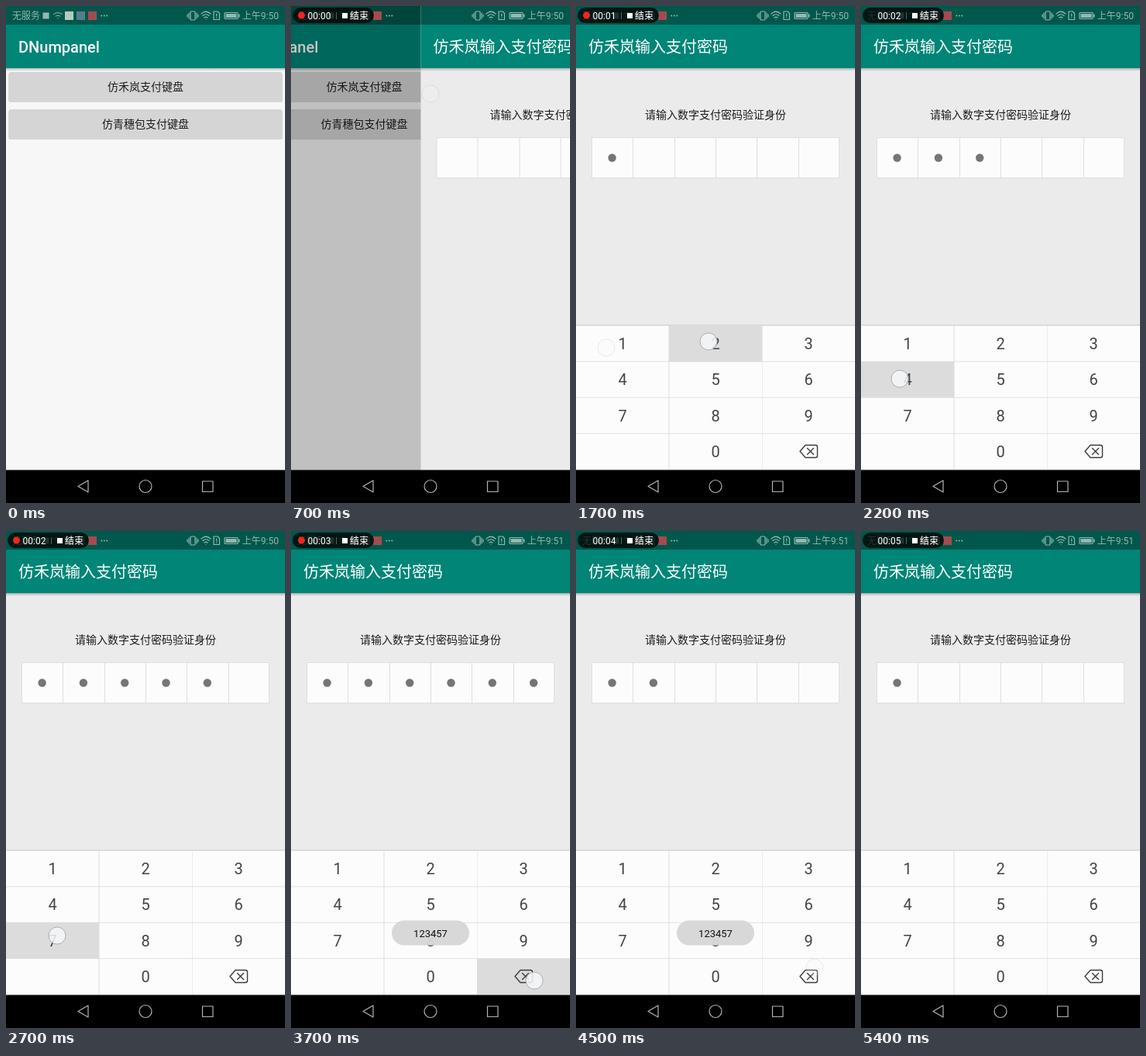
An HTML page that plays this animation: 360x640 px, repeating every 5.6 s.

```html
<!DOCTYPE html>
<html lang="zh-CN">
<head>
<meta charset="utf-8">
<title>Keypad demo</title>
<style>
html, body { margin: 0; width: 100%; height: 100%; overflow: hidden; background: #000; }
svg { display: block; width: 360px; height: 640px; font-family: Roboto, "Noto Sans CJK SC", "Noto Sans CJK", sans-serif; }
.title { font-size: 20px; font-weight: 500; fill: #fff; }
.label { font-size: 14px; text-anchor: middle; fill: #1c1c1c; }
.btn { font-weight: 500; }
.digit { font-size: 20px; text-anchor: middle; fill: #444; }
.small { font-size: 12px; }
.status { fill: #94b8b2; }
.line { fill: none; stroke-linecap: round; stroke-linejoin: round; }
</style>
</head>
<body>
<svg viewBox="0 0 360 640">
  <defs>
    <linearGradient id="fade" x2="0" y2="1">
      <stop stop-opacity=".25"/><stop offset="1" stop-opacity="0"/>
    </linearGradient>
    <g id="bars">
      <rect width="360" height="24" fill="#00574b"/>
      <rect y="24" width="360" height="56" fill="#008577"/>
      <rect y="80" width="360" height="4" fill="url(#fade)"/>
    </g>
    <g id="button">
      <rect x="3" y="86" width="354" height="38" rx="3" fill="#000" opacity=".13"/>
      <rect x="4" y="85" width="352" height="37.5" rx="2"/>
    </g>
  </defs>

  <g id="home">
    <rect width="360" height="598" fill="#f7f7f7"/>
    <use href="#bars"/>
    <text class="title" x="16" y="60">DNumpanel</text>
    <use id="first" href="#button"/>
    <use href="#button" y="48" fill="#d5d5d5"/>
    <text class="label btn" x="180" y="109">仿禾岚支付键盘</text>
    <text class="label btn" x="180" y="157">仿青穗包支付键盘</text>
  </g>
  <rect id="dim" width="360" height="598"/>

  <g id="pay">
    <rect width="360" height="598" fill="#ebebeb"/>
    <use href="#bars"/>
    <text class="title" x="16" y="60">仿禾岚输入支付密码</text>
    <text class="label" x="180" y="145">请输入数字支付密码验证身份</text>
    <rect x="20.5" y="169.5" width="319" height="52" fill="#fcfcfc" stroke="#dedede"/>
    <g id="cells"></g>
    <g id="pad">
      <rect y="410" width="360" height="188" fill="#dcdcdc"/>
      <g id="keys"></g>
      <g class="line" stroke="#3c3c3c" stroke-width="1.4">
        <path d="M289 573.5L296 565.5H309Q311.5 565.5 311.5 568V579Q311.5 581.5 309 581.5H296Z"/>
        <path d="M298.5 569.5L306.5 577.5M306.5 569.5L298.5 577.5"/>
      </g>
    </g>
  </g>

  <g class="status small">
    <text x="8" y="17">无服务</text>
    <rect x="47.5" y="8.5" width="8" height="8"/>
    <path class="line" stroke="#94b8b2" d="M61.5 10.5Q67 6.500 72.500 10.500M64 13Q67 11 70 13M67 15.500V16"/>
    <rect x="76" y="7" width="11" height="11" fill="#b5c9bd"/>
    <rect x="91" y="7" width="11" height="11" fill="#577d8b"/>
    <rect x="106" y="7" width="11" height="11" fill="#a44b50"/>
    <g><circle cx="123.300" cy="12.500" r="1"/><circle cx="126.800" cy="12.500" r="1"/><circle cx="130.300" cy="12.500" r="1"/></g>
    <g class="line" stroke="#94b8b2" stroke-width="1.2">
      <rect x="238" y="7" width="6" height="11" rx="1"/>
      <path d="M236 9V16M246 9V16M234 11V14M248 11V14"/>
      <path d="M252 10Q258 4.500 264 10M254 12.500Q258 9 262 12.500M256 15Q258 13.300 260 15M258 17V17.100"/>
      <path d="M268 7H273L275.500 9.500V17.500H268ZM271.700 10V13M271.700 15V15.200"/>
      <rect x="282" y="8.500" width="17" height="8" rx="1"/>
    </g>
    <rect x="283.500" y="10" width="14" height="5"/>
    <rect x="300" y="10.500" width="1.500" height="4"/>
    <text id="clock" x="352" y="17" text-anchor="end"></text>
  </g>

  <g id="pill" class="small" fill="#fff">
    <rect x="2" y="2" width="105" height="20" rx="10" fill="#000" opacity=".74"/>
    <circle id="rec" cx="13.500" cy="12" r="4.500" fill="#f0271b"/>
    <text id="timer" x="21.500" y="16.500"></text>
    <rect x="58" y="8" width="1" height="9" opacity=".35"/>
    <rect x="66" y="9" width="7" height="7"/>
    <text x="76" y="16.500">结束</text>
  </g>

  <g id="toast">
    <rect x="130" y="501.500" width="100" height="32" rx="16" fill="#d7d7d7" opacity=".97"/>
    <text x="180" y="522.500" font-size="13" text-anchor="middle" fill="#111">123457</text>
  </g>

  <rect y="597.500" width="360" height="42.500"/>
  <g class="line" stroke="#b4b4b4" stroke-width="1.200">
    <path d="M93 618.500L106 611V626Z"/>
    <circle cx="180" cy="618.500" r="8"/>
    <rect x="253.500" y="612" width="13.500" height="13.500"/>
  </g>
  <g id="touches"></g>
</svg>

<script>
const LOOP = 5600, STEP = 100;
const $ = id => document.getElementById(id);
const clamp = v => Math.max(0, Math.min(1, v));

function add(parent, tag, attrs, text = "") {
  const el = document.createElementNS("http://www.w3.org/2000/svg", tag);
  for (const k in attrs) el.setAttribute(k, attrs[k]);
  el.textContent = text;
  return $(parent).appendChild(el);
}

const tap = (down, up, x, y, key) => ({ down, up, x, y, key });
const taps = [
  tap(400, 600, 180, 113, "open"),
  tap(1500, 1600, 39, 440, "1"),
  tap(1700, 1800, 171, 432, "2"),
  tap(1900, 2000, 290, 438, "3"),
  tap(2200, 2300, 50, 480, "4"),
  tap(2400, 2500, 172, 482, "5"),
  tap(2700, 2800, 66, 521, "7"),
  tap(3700, 3800, 314, 579, "del"),
  tap(3900, 4000, 312, 574, "del"),
  tap(4100, 4200, 310, 568, "del"),
  tap(4300, 4400, 308, 562, "del"),
  tap(4900, 5000, 304, 564, "del")
];

const dots = [];
for (let i = 0; i < 6; i++) {
  const x = 20 + i * 53.3;
  if (i) add("cells", "path", { d: `M${Math.round(x) + .5} 170V221`, stroke: "#dedede" });
  dots.push(add("cells", "circle", { cx: x + 26.6, cy: 195.5, r: 5.2, fill: "#757575" }));
}

const keys = {};
["1", "2", "3", "4", "5", "6", "7", "8", "9", "", "0", "del"].forEach((key, i) => {
  const x = i % 3 * 120, y = 412 + Math.floor(i / 3) * 46.33;
  keys[key] = add("keys", "rect", { x: x + (x ? .5 : 0), y, width: 119.5, height: 45.5 });
  if (key !== "del") add("keys", "text", { class: "digit", x: x + 60, y: y + 30 }, key);
});

for (const t of taps)
  t.el = add("touches", "circle", { cx: t.x, cy: t.y, r: 11, fill: "#f4f7f9", "fill-opacity": .85, stroke: "#a9b0b5" });

function draw(t) {
  const slide = 1 - Math.pow(1 - clamp((t - 600) / 400), 2.66);
  $("home").setAttribute("transform", `translate(${-160 * slide})`);
  $("pay").setAttribute("transform", `translate(${360 * (1 - slide)})`);
  $("dim").setAttribute("opacity", .42 * slide);

  const rise = 1 - Math.pow(1 - clamp((t - 950) / 250), 2);
  $("pad").setAttribute("transform", `translate(0 ${188 * (1 - rise)})`);

  let count = 0, held = "none";
  for (const p of taps) {
    const down = t >= p.down && t < p.up;
    if (down) held = p.key;
    if (t >= p.up && p.key !== "open") count += p.key === "del" ? -1 : 1;
    p.el.setAttribute("opacity", t < p.down ? 0 : down ? 1 : .5 * clamp(1 - (t - p.up) / 200));
  }
  dots.forEach((d, i) => d.setAttribute("visibility", i < count ? "inherit" : "hidden"));
  for (const k in keys) keys[k].setAttribute("fill", k === held ? "#dcdcdc" : "#fcfcfc");
  $("first").setAttribute("fill", held === "open" ? "#bdbdbd" : "#d5d5d5");

  $("toast").setAttribute("opacity", Math.min(clamp((t - 2800) / 200), clamp((5200 - t) / 200)));
  $("pill").setAttribute("visibility", t >= 100 ? "visible" : "hidden");
  $("rec").setAttribute("opacity", (t + 400) % 1000 < 500 ? 1 : 0);
  $("timer").textContent = "00:0" + Math.max(0, Math.floor((t - 100) / 1000));
  $("clock").textContent = t < 3000 ? "上午9:50" : "上午9:51";
}

const start = performance.now();
function tick() {
  const t = (performance.now() - start) % LOOP;
  draw(Math.min(5400, Math.floor(t / STEP) * STEP));
  requestAnimationFrame(tick);
}
tick();
</script>
</body>
</html>
```
